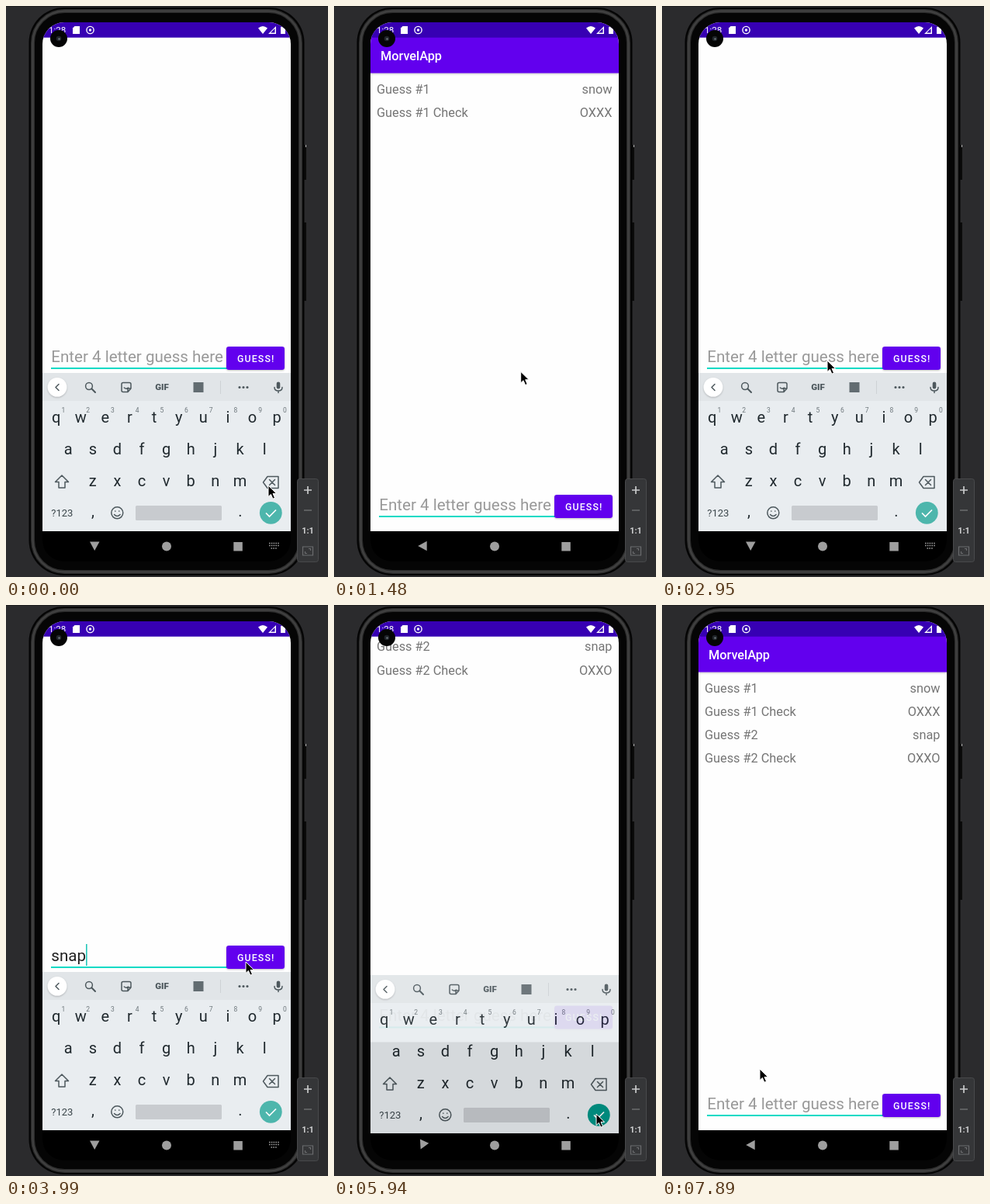
An HTML page that plays this animation: 415x736 px, repeating every 8 s.

```html
<!DOCTYPE html>
<html lang="en">
<head>
<meta charset="utf-8">
<title>Word guessing app</title>
<style>
  html, body { margin: 0; width: 100%; height: 100%; overflow: hidden; background: #2b2b2d; }
  svg { display: block; width: 415px; height: 736px; font-family: Roboto, sans-serif; }
  .mid { text-anchor: middle; }
  .end { text-anchor: end; }
  .list { font-size: 16.3px; fill: #757575; }
  .field { font-size: 20.55px; }
  .key { font-size: 20px; fill: #20292e; text-anchor: middle; }
  .digit { font-size: 8.5px; fill: #6d767b; text-anchor: middle; }
  .line { fill: none; stroke: #4d585d; stroke-width: 1.5; stroke-linejoin: round; stroke-linecap: round; }
  .rim { fill: none; stroke: #2c2c2c; stroke-width: 5; }
  .shine { fill: none; stroke: #404040; stroke-width: 2.4; }
</style>
</head>
<body>
<svg viewBox="0 0 415 736">
  <defs>
    <clipPath id="screen"><rect x="47" y="21" width="320" height="695" rx="28"/></clipPath>
    <filter id="soft" x="-20%" y="-30%" width="140%" height="170%">
      <feDropShadow dx="0" dy="1" stdDeviation="1" flood-opacity=".25"/>
    </filter>
  </defs>

  <!-- phone body -->
  <rect width="415" height="736" fill="#2b2b2d"/>
  <rect width="415" height="1" fill="#1f1f20"/>
  <rect x="384" y="179" width="3" height="45" fill="#0b0b0b"/>
  <rect x="386" y="179" width="1" height="3" fill="#b5b5b5"/>
  <rect x="384" y="279" width="3" height="101" fill="#0b0b0b"/>
  <rect x="29.5" y="2" width="355" height="732" rx="45" fill="#050505"/>
  <rect class="rim" x="34.5" y="6.5" width="345" height="723" rx="41"/>
  <rect class="shine" x="34.5" y="6.5" width="345" height="723" rx="41"/>

  <g clip-path="url(#screen)">
    <rect x="47" y="21" width="320" height="695" fill="#000"/>

    <g id="app">
      <rect x="47" y="0" width="320" height="677" fill="#fefefe"/>
      <rect x="47" y="30" width="320" height="56.5" fill="#6200ee" filter="url(#soft)"/>
      <text x="60" y="70" font-size="16.3" font-weight="500" fill="#fff">MorvelApp</text>
      <g id="rows" class="list"></g>
      <text id="entry" class="field" x="58.3" y="650"></text>
      <rect x="58" y="657" width="228" height="2" fill="#03dac5"/>
      <rect id="caret" y="628" width="1.5" height="28" fill="#16c4b4"/>
      <rect id="button" x="284" y="630" width="75" height="30" rx="3.3" filter="url(#soft)"/>
      <text x="298" y="649.5" font-size="12.4" font-weight="500" letter-spacing="1.1" fill="#fff">GUESS!</text>
    </g>

    <g id="board">
      <rect x="47" y="473" width="320" height="204" fill="#e9edf0"/>
      <rect x="47" y="473" width="320" height="36" fill="#e1e5e8"/>
      <circle cx="66" cy="491.3" r="12.3" fill="#fff" filter="url(#soft)"/>
      <path id="chevron" class="line" d="M68 487.500L64 491.500L68 495.500"/>
      <g id="tools">
        <g class="line">
          <circle cx="107" cy="490" r="4.4"/><path d="M110.300 493.300L115 498" stroke-width="2"/>
          <path d="M151 485.500H159Q161 485.500 161 487.500V493L157 497.500H151Q149 497.500 149 495.500V487.500Q149 485.500 151 485.500ZM161 493H158Q157 493 157 494V497.500M152.300 492Q155 494.500 157.500 492"/>
        </g>
        <text x="201" y="495.300" class="mid" font-size="11.500" font-weight="900" fill="#4d585d">GIF</text>
        <rect x="241.500" y="485" width="13" height="13" fill="#626c71"/>
        <path d="M276.500 483V500" stroke="#cdd2d5"/>
        <path d="M301 491.500H312" stroke="#4d585d" stroke-width="3.200" stroke-linecap="round" stroke-dasharray="0 5"/>
      </g>
      <rect x="348.700" y="484.500" width="4.600" height="9" rx="2.300" fill="#4d585d"/>
      <path class="line" d="M346 491.500Q346 496 351 496T356 491.500M351 496V498.500"/>
      <g id="keys"></g>
      <g class="line">
        <path d="M72 605L80.500 613.500H76V621H68V613.500H63.500Z"/>
        <path d="M337 606.500H351V621.500H337L331.500 614ZM339.500 610.500L346.500 617.500M346.500 610.500L339.500 617.500"/>
        <circle cx="143.300" cy="653.300" r="7.500"/>
        <path d="M139.500 655.500Q143.300 659.500 147.100 655.500M140.800 651V651.200M145.800 651V651.200"/>
      </g>
      <text x="72.300" y="658" class="mid" font-size="13" fill="#3a454a">?123</text>
      <rect x="167" y="644" width="111" height="19" rx="1.500" fill="#c8cbcf"/>
      <circle id="done" cx="341.300" cy="653.300" r="14.400"/>
      <path d="M335 653.500L339.500 658L348 649.500" fill="none" stroke="#fff" stroke-width="1.700"/>
    </g>

    <!-- navigation bar -->
    <g fill="#fff" fill-opacity=".62">
      <path id="back" d="M108 690.500H120.500L114.200 702Z"/>
      <circle cx="207" cy="696.500" r="6"/>
      <rect x="293.300" y="691" width="11.500" height="11.500"/>
      <path id="ime" d="M339 692.500H352M339 695.500H352M341.500 699H349.500" fill="none" stroke="#fff" stroke-opacity=".62" stroke-width="1.700" stroke-dasharray="1.600 1.200"/>
    </g>

    <!-- status bar -->
    <rect x="47" y="21" width="320" height="19.700" fill="#3700b3"/>
    <text x="55" y="35" font-size="11.500" fill="#fff">1:28</text>
    <path d="M88.500 26H95V36H86V28.500Z" fill="#fff"/>
    <circle cx="108.500" cy="31" r="4.600" fill="none" stroke="#fff" stroke-width="1.400"/>
    <circle cx="108.500" cy="31" r="1.700" fill="#fff"/>
    <path d="M325 28.500Q331 23.500 337 28.500L331 36ZM348 26V36H338Z" fill="#fff"/>
    <path d="M341 34.500H346.500V29Z" fill="#3700b3"/>
    <path d="M354 27H355.500V26H358.500V27H360V36H354Z" fill="#fff"/>
  </g>
  <circle cx="68" cy="42" r="11" fill="#050505"/>
  <circle cx="68" cy="42" r="3.300" fill="#20252a"/>
  <circle cx="68.500" cy="42.500" r="1.200" fill="#6c757c"/>

  <!-- zoom panel -->
  <rect x="375.500" y="609.500" width="27" height="107" rx="3" fill="#353638" stroke="#48494b"/>
  <path d="M384 624H394M389 619V629" stroke="#c9cacb" stroke-width="1.700"/>
  <path d="M384 650H394" stroke="#6b6c6e" stroke-width="1.500"/>
  <text x="389" y="680" class="mid" font-size="11" font-weight="700" fill="#d0d1d2">1:1</text>
  <path d="M382.500 697H395.500V708H382.500ZM385.500 703V705.500H388M390 699.500H392.500V702" fill="none" stroke="#6b6c6e" stroke-width="1.200"/>

  <path id="pointer" d="M0 0V14.500L3.400 11.400L5.900 17.200L8.500 16.100L6 10.400H10.600Z" fill="#000" stroke="#fff"/>
</svg>

<script>
const $ = id => document.getElementById(id);
const set = (id, name, value) => $(id).setAttribute(name, value);
const clamp = v => Math.min(1, Math.max(0, v));

function label(parent, text, x, y, cls) {
  const el = document.createElementNS("http://www.w3.org/2000/svg", "text");
  el.setAttribute("x", x);
  el.setAttribute("y", y);
  el.setAttribute("class", cls);
  el.textContent = text;
  $(parent).append(el);
}

const guesses = [["snow", "OXXX"], ["snap", "OXXO"]];
function listGuesses(count) {
  $("rows").replaceChildren();
  guesses.slice(0, count).forEach((pair, g) => pair.forEach((value, i) => {
    const y = 112.5 + 30.2 * (2 * g + i);
    label("rows", `Guess #${g + 1}${i ? " Check" : ""}`, 55, y, "");
    label("rows", value, 358.5, y, "end");
  }));
}

const keyRow = (letters, x, y, gap = 31.6, cls = "key") =>
  [...letters].forEach((c, i) => label("keys", c, x + gap * i, y, cls));
keyRow("qwertyuiop", 64.7, 537);
keyRow("asdfghjkl", 80.3, 577.5);
keyRow("zxcvbnm", 111.8, 619);
keyRow(",.", 112, 658, 190);
keyRow("1234567890", 74, 523.5, 31.7, "digit");

// All times below are in steps of about 148 ms.
const OPENS = 13, FIRST_HIDE = 2.01, SECOND_HIDE = 39;
const TYPES = 24, SUBMITS = 34;
const caretResets = [4, 16.5, 26.5, 35];

// Pointer stops: arrives, leaves, x, y
const stops = [
  [0, 0, 338, 618], [1, 2, 338, 656], [4, 4, 312, 598], [6, 6, 372, 130],
  [12, 16, 175, 642], [18, 23, 213, 457], [26, 29, 309, 460], [31, 35, 318, 449],
  [39, 40, 338, 656], [42, 43, 383, 640], [46, 46, 345, 168], [50, 50, 243, 504],
  [53, 54, 126, 598]
];

function pointerAt(k) {
  const i = stops.findLastIndex(s => s[0] <= k);
  const [, leaves, x, y] = stops[i];
  const [arrives, nx, ny] = (([a, , px, py]) => [a, px, py])(stops[i + 1] || stops[i]);
  const f = k > leaves ? (k - leaves) / (arrives - leaves) : 0;
  return [x + (nx - x) * f, y + (ny - y) * f];
}

function keyboardAt(k) {
  if (k >= OPENS && k < SECOND_HIDE) {
    const u = clamp((k - OPENS) / 3);
    return { pan: -191 * u ** 1.9, drop: 102 * (1 - u), alpha: u ** .63,
             turn: 90 * clamp(1.5 * (1 - u)), ime: 1, wide: u === 1, pressed: false };
  }
  const v = clamp((k - (k < OPENS ? FIRST_HIDE : SECOND_HIDE)) / 2);
  return { pan: -191 * (1 - v) ** .75, drop: 64 * v ** 4, alpha: clamp(1 - 1.05 * v ** 3.7),
           turn: 90 * v ** 1.85, ime: v ? 0 : 1, wide: true, pressed: v > 0 };
}

function caretVisible(k) {
  const reset = caretResets.findLast(r => r <= k);
  return reset !== undefined && Math.floor((k - reset) * .3) % 2 === 0;
}

function pose(k) {
  const kb = keyboardAt(k);
  set("app", "transform", `translate(0 ${kb.pan})`);
  set("board", "transform", `translate(0 ${kb.drop})`);
  set("board", "opacity", kb.alpha);
  set("back", "transform", `rotate(${kb.turn} 114.2 696)`);
  set("ime", "opacity", kb.ime);
  set("tools", "opacity", +kb.wide);
  set("chevron", "transform", kb.wide ? "" : "rotate(180 66 491.5)");
  set("done", "fill", kb.pressed ? "#009688" : "#4db6ac");

  const typed = k >= TYPES && k <= SUBMITS ? "snap".slice(0, k - TYPES + 1) : "";
  $("entry").textContent = typed || "Enter 4 letter guess here";
  set("entry", "fill", typed ? "#212121" : "#999");
  set("caret", "x", 58.4 + (typed && $("entry").getComputedTextLength()) * 1);
  set("caret", "opacity", +caretVisible(k));
  set("button", "fill", k >= SUBMITS && k < SUBMITS + 3 ? "#7f30ef" : "#6200ee");
  listGuesses(k > SUBMITS ? 2 : 1);
  set("pointer", "transform", `translate(${pointerAt(k)})`);
}

// The picture advances at a low, steady rate that slows slightly.
const stepAt = t => t < 4440 ? Math.min(29, Math.floor(t / 147.4)) : 30 + Math.floor((t - 4440) / 150);

let shown = -1;
function tick() {
  const k = stepAt(performance.now() % 8000);
  if (k !== shown) pose(shown = k);
  requestAnimationFrame(tick);
}
tick();
</script>
</body>
</html>
```
